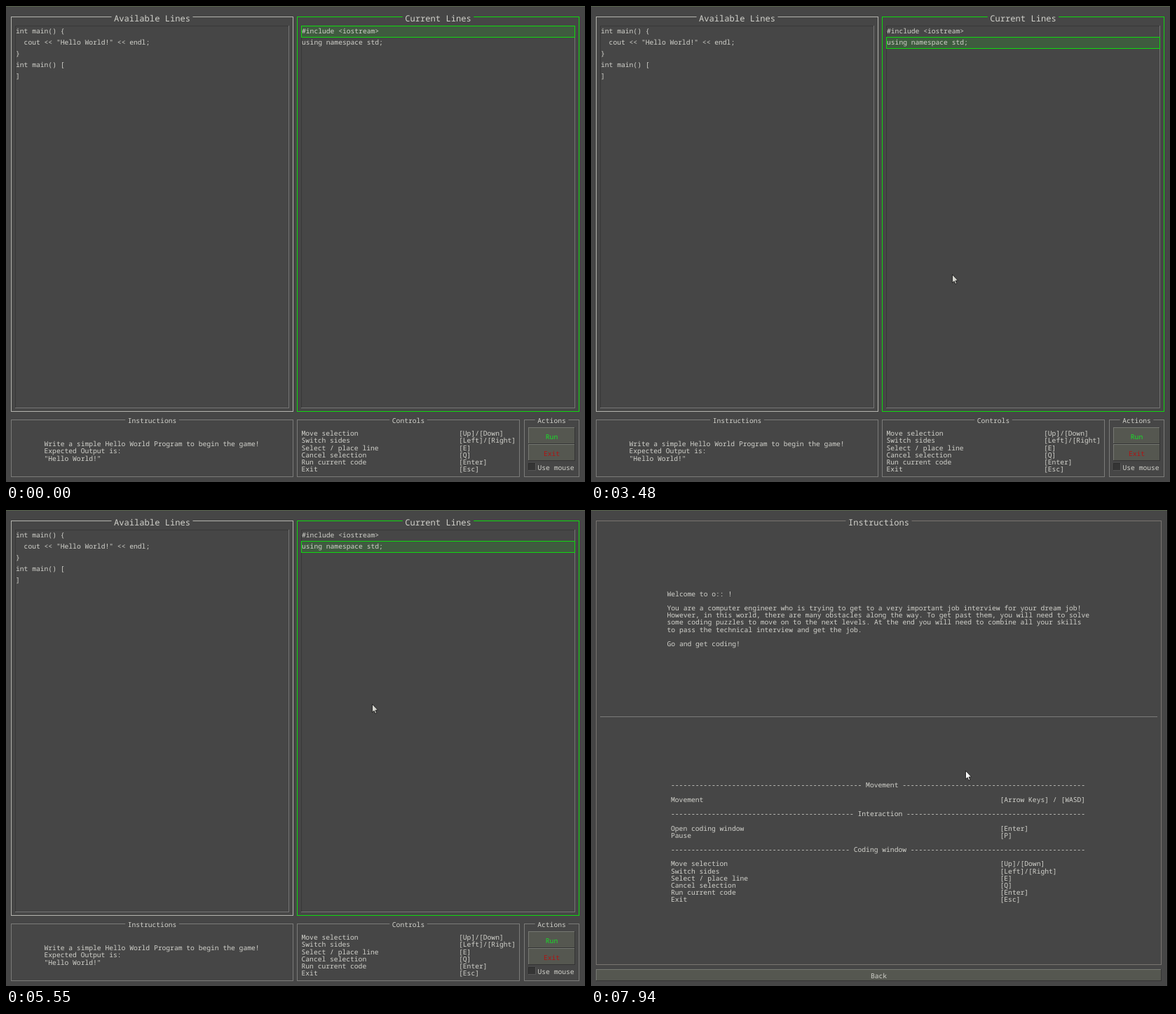
An HTML page with a canvas that plays this animation: 826x678 px, repeating every 8 s.

```html
<!DOCTYPE html>
<html lang="en">
<head>
<meta charset="utf-8">
<title>Code line puzzle</title>
<style>
  html, body { margin: 0; width: 100%; height: 100%; overflow: hidden; background: #000; }
  canvas { display: block; }
</style>
</head>
<body>
<canvas id="stage" width="826" height="678"></canvas>
<script>
const ctx = document.getElementById('stage').getContext('2d');
const LOOP = 8000, SMALL = 9.67, LARGE = 12.1, PITCH = 10.17;
const BG = '#464646', TEXT = '#d2d2cc', LINE = '#7b7b79', LIGHT = '#767872', DARK = '#343434';
const GREEN = '#10d810';

// Pointer tip as [time, x, y]; it eases from one stop to the next.
const path = [
  [70, 690, 516], [830, 778, 614], [900, 779, 616], [1100, 779, 616], [1240, 780, 613],
  [1500, 780, 613], [2260, 508, 391], [2330, 508, 389], [2460, 508, 386], [2750, 508, 386],
  [3140, 515, 382], [4500, 515, 382], [4950, 522, 277], [5300, 522, 277], [5350, 522, 276],
  [6690, 522, 276], [6950, 535, 341], [7939, 535, 341], [7940, 534, 371], [LOOP, 534, 371]
];
const presses = [[1500, 1570], [3340, 3410], [5480, 5550], [7410, 7480]];

const controls = [
  ['Move selection', '[Up]/[Down]'], ['Switch sides', '[Left]/[Right]'],
  ['Select / place line', '[E]'], ['Cancel selection', '[Q]'],
  ['Run current code', '[Enter]'], ['Exit', '[Esc]']
];
const welcome = [
  'Welcome to o:: !', '',
  'You are a computer engineer who is trying to get to a very important job interview for your dream job!',
  'However, in this world, there are many obstacles along the way. To get past them, you will need to solve',
  'some coding puzzles to move on to the next levels. At the end you will need to combine all your skills',
  'to pass the technical interview and get the job.', '',
  'Go and get coding!'
];
const help = [
  ['Movement'], [], ['Movement', '[Arrow Keys] / [WASD]'], [],
  ['Interaction'], [], ['Open coding window', '[Enter]'], ['Pause', '[P]'], [],
  ['Coding window'], [], ...controls
];

let pointer, pressed, hoverable;

function pointerAt(t) {
  if (t < path[0][0]) return null;
  const i = path.findIndex(stop => stop[0] > t);
  const [t0, x0, y0] = path[i - 1], [t1, x1, y1] = path[i];
  const u = (t - t0) / (t1 - t0), e = u * u * (3 - 2 * u);
  return { x: Math.round(x0 + (x1 - x0) * e), y: Math.round(y0 + (y1 - y0) * e) };
}

function fill(x, y, w, h, color) {
  ctx.fillStyle = color;
  ctx.fillRect(x, y, w, h);
}

function outline(x, y, w, h, color, width = 1) {
  ctx.strokeStyle = color;
  ctx.lineWidth = width;
  ctx.strokeRect(x + 0.5, y + 0.5, w - 1, h - 1);
}

// y is the visual middle of the line.
function text(str, x, y, { color = TEXT, size = SMALL, align = 'left' } = {}) {
  ctx.font = `${size}px "Noto Sans Mono", monospace`;
  ctx.textAlign = align;
  ctx.fillStyle = color;
  ctx.fillText(str, x, y + size * 0.33);
}

function lines(list, x, y, pitch = PITCH) {
  list.forEach((str, i) => text(str, x, y + i * pitch));
}

function bevel(x, y, w, h, topLeft, bottomRight) {
  fill(x, y, w, 1, topLeft);
  fill(x, y, 1, h, topLeft);
  fill(x, y + h - 1, w, 1, bottomRight);
  fill(x + w - 1, y, 1, h, bottomRight);
}

function frame(label, x, y, w, h, { color = LINE, size = SMALL, width = 1 } = {}) {
  outline(x, y, w, h, color, width);
  const cx = x + w / 2;
  ctx.font = `${size}px "Noto Sans Mono", monospace`;
  const half = ctx.measureText(label).width / 2 + 3.5;
  fill(cx - half, y - 1, half * 2, 3, BG);
  text(label, cx, y + (size === LARGE ? 2.8 : 2.3), { size, align: 'center' });
}

function button(label, x, y, w, h, color = TEXT, hoverColor = '#fff', cy = y + h / 2 + 1.5) {
  const over = hoverable && pointer && pointer.x >= x && pointer.x < x + w
    && pointer.y >= y && pointer.y < y + h;
  const down = over && pressed, shift = down ? 1 : 0;
  fill(x, y, w, h, down ? '#555555' : over ? '#666862' : '#555750');
  if (down) bevel(x, y, w, h, DARK, LIGHT);
  else bevel(x, y, w, h, LIGHT, DARK);
  text(label, x + w / 2 + shift, cy + shift,
    { color: down ? '#000' : over ? hoverColor : color, align: 'center' });
}

function dialogBox(y, h) {
  fill(229, y, 362, h, BG);
  outline(229, y, 362, h, '#59614f');
}

function codePanel(label, x, w, color, code) {
  frame(label, x, 15, w, 563, { color, size: LARGE });
  bevel(x + 6, 28, w - 12, 545, '#383838', '#747474');
  lines(code, x + 7, 36, 16);
}

function drawGame(selected) {
  fill(0, 0, 826, 678, BG);
  fill(0, 0, 826, 1, '#59664d');
  codePanel('Available Lines', 7, 403, '#b4b4ae',
    ['int main() {', '  cout << "Hello World!" << endl;', '}', 'int main() [', ']']);
  codePanel('Current Lines', 415, 403, GREEN, []);
  if (selected >= 0) {
    fill(421, 28 + selected * 16, 391, 17, '#3f5b3f');
    outline(421, 28 + selected * 16, 391, 17, GREEN);
  }
  lines(['#include <iostream>', 'using namespace std;'], 422, 36, 16);

  frame('Instructions', 7, 589, 403, 82);
  lines(['Write a simple Hello World Program to begin the game!',
    'Expected Output is:', '"Hello World!"'], 54.5, 624);
  frame('Controls', 415, 589, 318, 82);
  controls.forEach(([action, key], i) => {
    text(action, 421.5, 609 + i * PITCH);
    text(key, 646, 609 + i * PITCH);
  });
  frame('Actions', 739, 589, 79, 82);
  button('Run', 745, 600, 67, 24, '#18e028', '#30ff40', 614);
  button('Exit', 745, 624, 67, 24, '#b01414', '#ff2020', 638);
  fill(745, 651, 11, 11, '#353535');
  bevel(745, 651, 11, 11, '#2c2c2c', '#555');
  text('Use mouse', 758.5, 658);
}

function drawInfo() {
  dialogBox(285, 109);
  frame('Info', 237, 298, 346, 65, { color: '#c81414', width: 1.5 });
  lines(['Incorrect!', 'Press the continue button to retry.'], 308, 330);
  button('Continue', 237, 369, 346, 17, TEXT, '#fff', 379);
}

function drawPause() {
  fill(0, 0, 826, 678, '#000');
  dialogBox(194, 291);
  frame('Pause', 237, 209, 347, 268, { size: LARGE });
  button('Return To Game', 243, 223, 334, 78, TEXT, '#fff', 264);
  button('Instruction', 243, 307, 334, 78, TEXT, '#fff', 348);
  button('Exit To Main Menu', 243, 391, 334, 79, '#dc1414', '#ff2020', 433);
}

function drawInstructions() {
  fill(0, 0, 826, 678, '#000');
  fill(0, 0, 822, 678, BG);
  fill(0, 0, 822, 1, '#59664d');
  frame('Instructions', 7, 15, 807, 633, { color: '#787470', size: LARGE });
  lines(welcome, 108.5, 119.5);
  fill(13, 294, 795, 1, LINE);
  help.forEach(([label, key], i) => {
    if (!label) return;
    const y = 392.3 + i * PITCH;
    if (key) {
      text(label, 114, y);
      text(key, 583.5, y);
    } else {
      const before = '-'.repeat(51 - Math.ceil(label.length / 2));
      text(`${before} ${label} `.padEnd(102, '-'), 114, y);
    }
  });
  button('Back', 7, 654, 807, 17, TEXT, '#fff', 664);
}

function drawPointer(color) {
  ctx.save();
  ctx.translate(pointer.x + 0.5, pointer.y + 0.5);
  ctx.beginPath();
  [[0, 0], [0, 11.8], [2.6, 9.4], [4.4, 13.6], [6.3, 12.8], [4.5, 8.8], [8, 8.5]]
    .forEach(([x, y]) => ctx.lineTo(x, y));
  ctx.closePath();
  ctx.fillStyle = color;
  ctx.fill();
  ctx.strokeStyle = '#111';
  ctx.lineWidth = 0.8;
  ctx.stroke();
  ctx.restore();
}

function draw(t) {
  pointer = pointerAt(t);
  pressed = presses.some(([from, to]) => t >= from && t < to);
  const info = t >= 1570 && t < 3410;
  const paused = (t >= 3880 && t < 5550) || (t >= 6280 && t < 7480);
  const instructions = t >= 7480;
  // A newly opened menu reacts only once the pointer moves.
  hoverable = !info && !(t >= 3880 && t < 4540);

  if (instructions) drawInstructions();
  else if (paused) drawPause();
  else {
    drawGame(t < 1570 ? 0 : t < 3480 ? -1 : 1);
    if (info) {
      hoverable = true;
      drawInfo();
    }
  }
  if (pointer) drawPointer(info || paused || instructions ? '#fff' : '#d4d4ce');
}

ctx.textRendering = 'geometricPrecision';
const start = performance.now();
function tick() {
  draw((performance.now() - start) % LOOP);
  requestAnimationFrame(tick);
}
tick();
</script>
</body>
</html>
```
